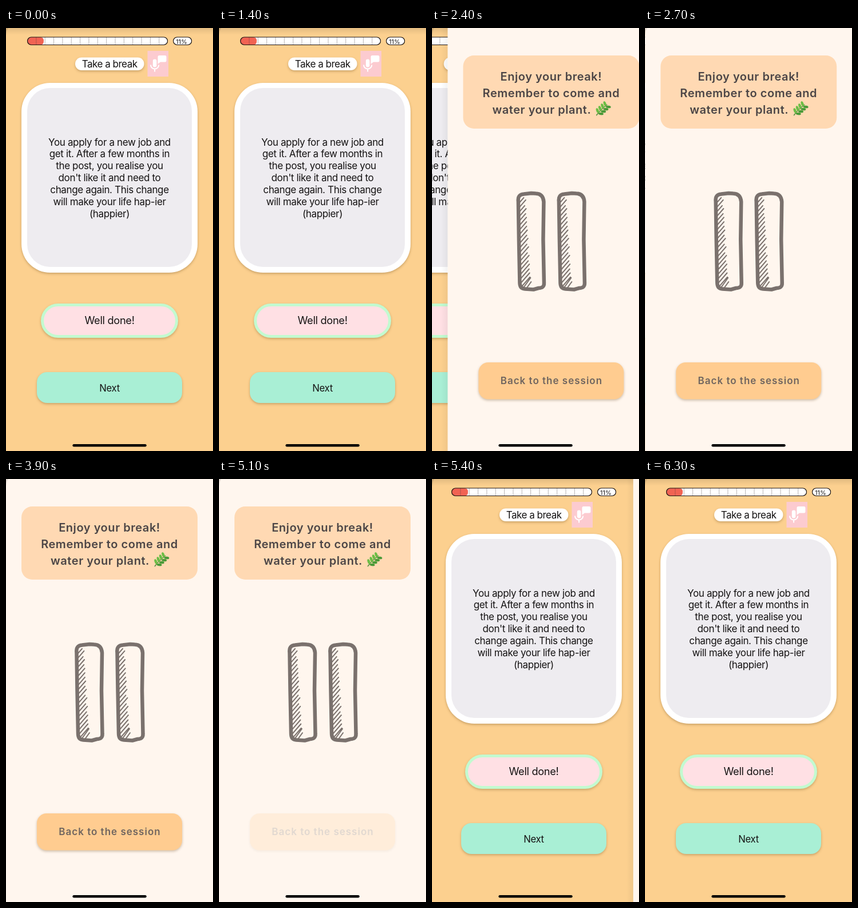
Animation of 362x740 px, one loop 6400 ms. Source, as an HTML page:

```html
<!DOCTYPE html>
<html lang="en">
<head>
<meta charset="utf-8">
<title>Take a break</title>
<style>
  html, body { margin: 0; width: 100%; height: 100%; overflow: hidden; background: #fcd08f; }
  svg { display: block; width: 362px; height: 740px; }
  text { font-family: Inter, "Open Sans", sans-serif; text-anchor: middle; }
  svg { fill: #151313; }
  .shadow { filter: drop-shadow(0 2px 2px rgba(90, 55, 10, .3)); }
  .story { font-size: 17px; letter-spacing: -.36px; }
  .title { font-size: 20px; font-weight: 600; letter-spacing: .55px; fill: #4b4546; }
</style>
</head>
<body>
<svg viewBox="0 0 362 740">
  <defs>
    <linearGradient id="edge"><stop offset="0" stop-opacity="0"/><stop offset="1" stop-opacity=".05"/></linearGradient>
    <linearGradient id="top" x2="0" y2="1"><stop offset="0" stop-opacity=".1"/><stop offset="1" stop-opacity="0"/></linearGradient>
    <g id="bar" fill="none" stroke="#7a716d" stroke-linecap="round" stroke-linejoin="round">
      <path stroke-width="6.5" d="M123.500 304Q122 291 133 290.500L146 289L154 289.500Q167 290 168 304L167 370L168.500 446Q169 455 159 455L150 457.500L135 456.500Q126 456 126 445L124.500 370Z"/>
      <path id="hatch" stroke-width="2"/>
    </g>
  </defs>

  <g id="session">
    <rect width="474" height="740" fill="#fcd08f"/>
    <rect width="474" height="12" fill="url(#top)"/>
    <rect x="37.5" y="16" width="245" height="13.5" rx="6.7" fill="#fff"/>
    <path d="M44 16H60Q66 16 66 22.7T60 29.5H44A6.7 6.7 0 0 1 44 16Z" fill="#f16353"/>
    <path id="ticks" stroke="#4a4040" stroke-width=".6" opacity=".65"/>
    <g fill="none" stroke="#1c1412" stroke-width="1.2">
      <rect x="37.5" y="16" width="245" height="13.5" rx="6.7"/>
      <rect x="292.6" y="16" width="32" height="13.5" rx="6.7" fill="#fff"/>
    </g>
    <text x="307" y="27.5" font-size="11">11%</text>

    <g id="pause">
      <rect class="shadow" x="121" y="51.5" width="120.5" height="22.5" rx="11.2" fill="#fff"/>
      <text class="story" x="181.2" y="68.7" style="letter-spacing:-.5px">Take a break</text>
    </g>

    <rect x="247.5" y="40" width="36.5" height="45" fill="#fccbd0"/>
    <g fill="#fff">
      <rect x="256.8" y="54.5" width="6.6" height="14" rx="3.3"/>
      <path d="M253 64.5A7.1 7.1 0 0 0 267.2 64.5M260.1 71.5V76.5" fill="none" stroke="#fff" stroke-width="2"/>
      <path d="M268 48H278Q280.5 48 280.5 50.5V57Q280.5 59.5 278 59.5H270L265.5 63V50.5Q265.5 48 268 48Z"/>
    </g>

    <rect class="shadow" x="27" y="96" width="308" height="332" rx="50" fill="#fff"/>
    <rect x="37" y="105" width="288" height="313" rx="40" fill="#eeecf0"/>
    <g id="story" class="story"></g>

    <rect class="shadow" x="63.5" y="484.5" width="235" height="55" rx="27.5" fill="#ffe0e4" stroke="#c3fad0" stroke-width="5"/>
    <text x="181" y="518" font-size="18.2" letter-spacing="-.3">Well done!</text>
    <rect class="shadow" x="54" y="602" width="254" height="54" rx="18" fill="#a9efd5"/>
    <text x="181" y="635.5" font-size="16.7" letter-spacing="-.3">Next</text>
  </g>

  <g id="break">
    <rect x="-12" width="12" height="740" fill="url(#edge)"/>
    <rect width="362" height="740" fill="#fff6ee"/>
    <rect x="27" y="48" width="308" height="128" rx="19" fill="#ffd9b3"/>
    <g id="title" class="title"></g>
    <path d="M260 153Q266 144 279 134" fill="none" stroke="#4b8f3a" stroke-width="1.5"/>
    <g id="leaves"></g>
    <use href="#bar"/>
    <use href="#bar" x="71"/>
    <g id="back">
      <rect class="shadow" x="54" y="585" width="254" height="64.5" rx="17" fill="#ffcc90"/>
      <text x="181.5" y="623.3" font-size="17" font-weight="600" letter-spacing="1" fill="#70655f">Back to the session</text>
    </g>
  </g>

  <path d="M0 0H4Q1 3 0 13Z" opacity=".12"/>
  <rect x="116.4" y="727.9" width="129.3" height="4.7" rx="2.3" fill="#000"/>
</svg>
<script>
const $ = id => document.getElementById(id);
const WIDTH = 362, LOOP = 6400, STEP = 100;
const PUSH = 2168, POP = 5102;

const lines = (id, x, y, gap, rows) => {
  $(id).innerHTML = rows.map((row, i) => `<text x="${x}" y="${y + i * gap}">${row}</text>`).join('');
};
lines('story', 181, 205.5, 20.85, [
  'You apply for a new job and', 'get it. After a few months in', 'the post, you realise you',
  "don't like it and need to", 'change again. This change', 'will make your life hap-ier', '(happier)'
]);
lines('title', 181, 92.2, 29, ['Enjoy your break!', 'Remember to come and']);
$('title').innerHTML += '<text x="164.5" y="150.2">water your plant.</text>';

let ticks = '', hatch = '', leaves = '';
for (let i = 1; i < 16; i++) ticks += `M${37.5 + i * 15.35} 16v13.5`;
for (let i = 0; i < 20; i++) {
  const dx = 8 + i * .3 + 3 * Math.abs(Math.sin(i * 1.7));
  hatch += `M${125 + i * .15} ${306 + i * 7.8}l${dx} ${-dx * 1.15}`;
}
hatch += 'M132 455l13 -18M138 455l8 -11';
for (let i = 0; i < 4; i++) {
  const x = 264 + i * 4.3, y = 148.5 - i * 4;
  for (const [dx, dy, turn, fill] of [[-2, -4, 70, '#6cbd45'], [4, 1.5, 5, '#4a9a38']])
    leaves += `<ellipse cx="${x + dx}" cy="${y + dy}" rx="4.5" ry="2.3" fill="${fill}" transform="rotate(${turn} ${x + dx} ${y + dy})"/>`;
}
$('ticks').setAttribute('d', ticks);
$('hatch').setAttribute('d', hatch);
$('leaves').innerHTML = leaves;

const clamp = v => Math.min(1, Math.max(0, v));
const ease = v => v < .5 ? 2 * v * v : 1 - 2 * (1 - v) ** 2;

// Critically damped spring, 0 to 1
const spring = ms => {
  const x = Math.max(0, ms) / 1000 * Math.sqrt(1000 / 3);
  return 1 - (1 + x) * Math.exp(-x);
};

// Opacity of a button pressed at `down` and released at `up`
const press = (t, down, up) =>
  1 - .8 * ease(clamp((t - down) / (up - down))) + .8 * ease(clamp((t - up) / 250));

function draw(now) {
  const t = Math.floor((now % LOOP + 3) / STEP) * STEP % LOOP;
  const shown = t < POP ? spring(t - PUSH) : 1 - spring(t - POP);
  $('session').setAttribute('transform', `translate(${-.3 * WIDTH * shown})`);
  $('break').setAttribute('transform', `translate(${WIDTH * (1 - shown)})`);
  $('break').style.display = shown > .0005 ? '' : 'none';
  $('pause').setAttribute('opacity', press(t, 2040, 2165));
  $('back').setAttribute('opacity', press(t, 5001, 5098));
  requestAnimationFrame(() => draw(performance.now()));
}
draw(performance.now());
</script>
</body>
</html>
```
